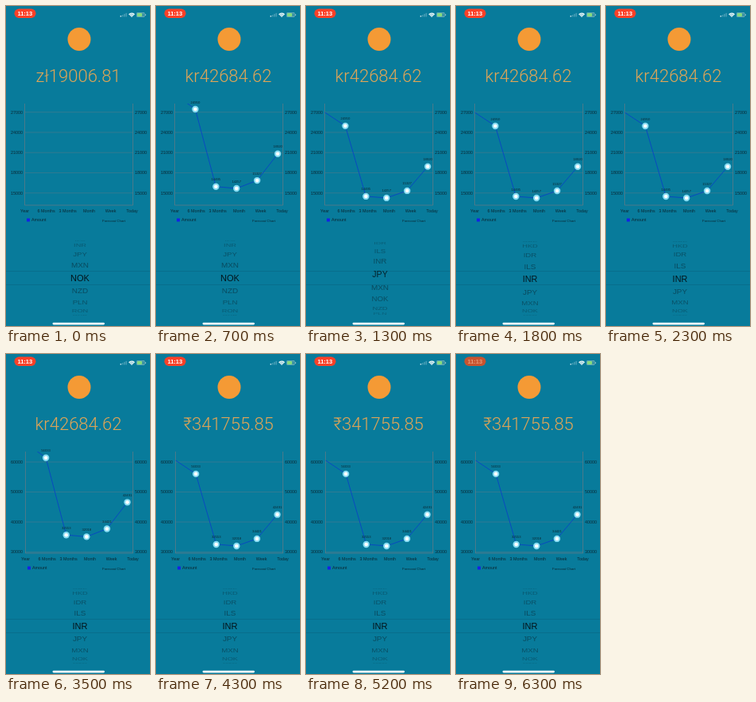
Recreate the animation shown at these times as an HTML page with a canvas. Size 181x400 px, loop 6.4 s.

```html
<!DOCTYPE html>
<html>
<head>
<meta charset="utf-8">
<style>
html, body { margin: 0; width: 100%; height: 100%; overflow: hidden; background: #087b9b; }
canvas { display: block; width: 181px; height: 400px; }
</style>
</head>
<body>
<canvas id="stage"></canvas>
<script>
const W = 181, H = 400, LOOP = 6400;
const canvas = document.getElementById('stage');
const ctx = canvas.getContext('2d');
const dpr = window.devicePixelRatio || 1;
canvas.width = W * dpr;
canvas.height = H * dpr;

const FONT = '"Liberation Sans", Arial, sans-serif';
const LIGHT_FONT = 'Roboto, "Liberation Sans", sans-serif';
const BACK = '#087b9b', INK = '#0b2833', GRID = 'rgba(118, 122, 128, .6)';
const CODES = ['CNY', 'EUR', 'GBP', 'HKD', 'IDR', 'ILS', 'INR', 'JPY', 'MXN', 'NOK', 'NZD', 'PLN', 'RON', 'RUB'];
const PERIODS = ['Year', '6 Months', '3 Months', 'Month', 'Week', 'Today'];
const ZERO_Y = 360, GROW = 1500;
const PRICES = [26970, 24950, 14495, 14257, 15327, 18920];
const CHARTS = [
  { start: -170, left: 23.5, right: 159.5, step: 25.9, unit: 0.008417, rate: 1, ticks: [27000, 24000, 21000, 18000, 15000] },
  { start: 2700, left: 24.5, right: 159.5, step: 25.6, unit: 0.00375, rate: 2.2458, ticks: [60000, 50000, 40000, 30000] }
];

const clamp = x => Math.max(0, Math.min(1, x));
const smooth = x => (x = clamp(x), x * x * (3 - 2 * x));

function easeOutBack(p) {
  const s = 1.70158, u = clamp(p) - 1;
  return u * u * ((s + 1) * u + s) + 1;
}

function text(str, x, y, size, color, align = 'center', weight = '', font = FONT) {
  ctx.font = `${weight} ${size}px ${font}`;
  ctx.textAlign = align;
  ctx.textBaseline = 'alphabetic';
  ctx.fillStyle = color;
  ctx.fillText(str, x, y + size * 0.36);
}

function disc(x, y, r, color) {
  ctx.fillStyle = color;
  ctx.beginPath();
  ctx.arc(x, y, r, 0, Math.PI * 2);
  ctx.fill();
}

function pill(x, y, w, h, r, color) {
  ctx.fillStyle = color;
  ctx.beginPath();
  ctx.roundRect(x, y, w, h, r);
  ctx.fill();
}

function line(points, color, width) {
  ctx.strokeStyle = color;
  ctx.lineWidth = width;
  ctx.beginPath();
  points.forEach(([x, y]) => ctx.lineTo(x, y));
  ctx.stroke();
}

function drawStatus(t) {
  const fading = t >= 6250;
  pill(10.5, 3.5, 27, 11.5, 5.75, fading ? '#c9532f' : '#fb4128');
  text('11:13', 23.8, 9.2, 7.5, fading ? '#e59a78' : '#fff', 'center', 'bold');
  for (let i = 0; i < 4; i++) {
    const h = 1.6 + i * 1.1;
    pill(143.5 + i * 2.3, 13.6 - h, 1.5, h, 0.4, i ? '#4a9fb6' : '#d5eaf0');
  }
  ctx.fillStyle = '#f2fafc';
  ctx.beginPath();
  ctx.moveTo(158, 14);
  ctx.arc(158, 14, 5.5, -Math.PI * 0.76, -Math.PI * 0.24);
  ctx.fill();
  ctx.strokeStyle = BACK;
  ctx.lineWidth = 0.5;
  for (const r of [2, 3.8]) {
    ctx.beginPath();
    ctx.arc(158, 14, r, -Math.PI * 0.76, -Math.PI * 0.24);
    ctx.stroke();
  }
  pill(164, 8, 10.5, 6, 1.7, '#8fc0c9');
  pill(164.5, 8.5, 9.5, 5, 1.3, '#3c93a4');
  pill(165, 9, 6, 4, 1, '#86dc7c');
  pill(175, 10, 1, 2, 0.5, '#8fc0c9');
}

function drawChart(t) {
  const { start, left, right, step, unit, rate, ticks } = CHARTS[t < CHARTS[1].start ? 0 : 1];
  const phase = easeOutBack((t - start) / GROW);
  const toY = v => ZERO_Y - v * unit;
  const top = 122, bottom = 249;

  for (const v of ticks) {
    const y = toY(v);
    line([[left, y], [right, y]], GRID, 0.6);
    text(v, 21, y, 5.4, INK, 'right');
    text(v, 162, y, 5.4, INK, 'left');
  }
  line([[left, top], [left, bottom], [right, bottom], [right, top]], GRID, 1);
  PERIODS.forEach((name, i) => text(name, left + i * 27, 256, 5.4, INK));
  pill(left + 2.5, 265.5, 4, 4, 0, '#1224e6');
  text('Amount', left + 8.5, 267.5, 5.4, INK, 'left');
  text('Forecast Chart', 150, 268, 4.4, INK, 'right');

  const points = PRICES.map((p, i) => [left + i * step, toY(p * rate * phase)]);
  ctx.save();
  ctx.beginPath();
  ctx.rect(left, top, right - left, bottom - top);
  ctx.clip();
  line(points, '#0a45c4', 0.9);
  ctx.restore();
  points.forEach(([x, y], i) => {
    if (!i || y > bottom || y < top) return;
    disc(x, y, 4.2, '#86dcf2');
    disc(x, y, 2.3, '#fff');
    text(Math.round(PRICES[i] * rate), x, y - 9, 4.2, INK);
  });
}

function drawPicker(t) {
  const rows = 3.09 * smooth((t - 850) / 850) - 0.09 * smooth((t - 2100) / 400);
  const middle = CODES.indexOf('NOK') - rows;
  for (const y of [331.5, 348.5]) line([[0, y], [W, y]], 'rgba(10, 70, 92, .4)', 0.6);
  CODES.forEach((code, i) => {
    const d = i - middle;
    if (Math.abs(d) > 4.2) return;
    const angle = d * Math.PI / 9, depth = Math.cos(angle);
    const near = clamp(1 - Math.abs(d) * 1.5);
    ctx.save();
    ctx.translate(93, 340 + 47 * Math.sin(angle));
    ctx.scale(0.84 + 0.16 * depth, depth);
    ctx.globalAlpha = near + (1 - near) * (0.2 + 0.5 * depth);
    text(code, 0, 0, 10 + near, near > 0.5 ? '#04141b' : '#0a3443');
    ctx.restore();
  });
}

function draw(t) {
  ctx.setTransform(dpr, 0, 0, dpr, 0, 0);
  ctx.fillStyle = BACK;
  ctx.fillRect(0, 0, W, H);
  drawStatus(t);
  disc(92, 41.5, 14.5, '#f49a35');
  const amount = t < 650 ? 'zł19006.81' : t < 3550 ? 'kr42684.62' : '₹341755.85';
  text(amount, 91, 87, 22, '#dfa556', 'center', 300, LIGHT_FONT);
  drawChart(t);
  drawPicker(t);
  pill(58.5, 395.7, 65.5, 2.8, 1.4, '#f4fafc');
}

const begin = performance.now();
function tick() {
  draw((performance.now() - begin) % LOOP);
  requestAnimationFrame(tick);
}
tick();
</script>
</body>
</html>
```
